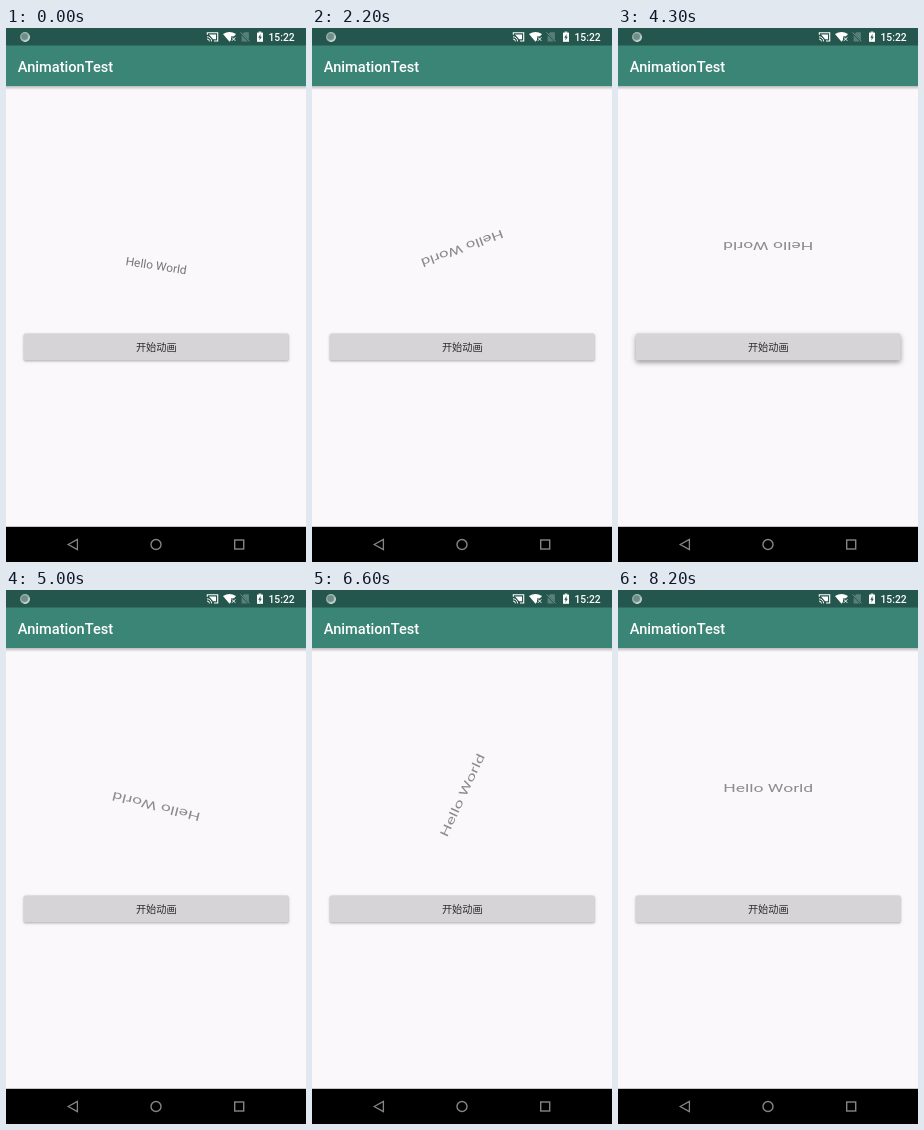
An HTML page with a canvas that plays this animation: 300x534 px, repeating every 8400 ms.

```html
<!DOCTYPE html>
<html lang="zh">
<head>
<meta charset="utf-8">
<title>AnimationTest</title>
<style>
html, body { margin: 0; width: 100%; height: 100%; overflow: hidden; background: #faf8fb; }
canvas { display: block; width: 300px; height: 534px; }
</style>
</head>
<body>
<canvas id="stage"></canvas>
<script>
const W = 300, H = 534, LOOP = 8400, STEP = 100;
const PRESS = 4300, RELEASE = 4800, TURN = 3900;
const SANS = 'Roboto, "Noto Sans CJK SC", "Noto Sans CJK", sans-serif';
const BAR = '#25564d', WHITE = '#fff', GREY = '#858585', DIM = '#6d8f88';
const FULL = 2 * Math.PI;

const canvas = document.getElementById('stage');
const ctx = canvas.getContext('2d');
const ratio = window.devicePixelRatio || 1;
canvas.width = W * ratio;
canvas.height = H * ratio;

const clamp = v => Math.max(0, Math.min(1, v));
const ease = u => (1 - Math.cos(Math.PI * clamp(u))) / 2;

// The first half turn is already under way when the loop starts
// and slows down slightly; the second runs at an even pace.
function halfTurns(t) {
  const s = t / 1000;
  const first = 0.142 + 0.329 * s - 0.0172 * s * s;
  return t < PRESS ? ease(t < 3100 ? first : 1) : 1 + ease((t - PRESS) / TURN);
}

function rect(x, y, w, h, color) {
  ctx.fillStyle = color;
  ctx.fillRect(x, y, w, h);
}

function path(points, closed) {
  ctx.beginPath();
  points.forEach(([x, y], i) => i ? ctx.lineTo(x, y) : ctx.moveTo(x, y));
  if (closed) ctx.closePath();
}

function shape(points, color) {
  path(points, true);
  ctx.fillStyle = color;
  ctx.fill();
}

function line(points, color, width, closed) {
  path(points, closed);
  ctx.strokeStyle = color;
  ctx.lineWidth = width;
  ctx.stroke();
}

function arc(x, y, r, from, to, color, width) {
  ctx.beginPath();
  ctx.arc(x, y, r, from, to);
  ctx.strokeStyle = color;
  ctx.lineWidth = width;
  ctx.stroke();
}

function disc(x, y, r, color) {
  ctx.beginPath();
  ctx.arc(x, y, r, 0, FULL);
  ctx.fillStyle = color;
  ctx.fill();
}

function label(text, x, y, size, weight, color, align = 'left') {
  ctx.font = `${weight} ${size}px ${SANS}`;
  ctx.textAlign = align;
  ctx.fillStyle = color;
  ctx.fillText(text, x, y);
}

function drawSync() {
  disc(19, 9, 4.9, '#a4b8b4');
  disc(18.6, 8.6, 3.3, DIM);
  arc(19, 9, 4.2, -0.3, 1.9, '#d3dfdc', 1.1);
}

function drawCast() {
  line([[201.3, 6.8], [201.3, 4.8], [211.7, 4.8], [211.7, 13], [208, 13]], WHITE, 1.1);
  shape([[203, 6.6], [210, 6.6], [210, 11.3], [207.2, 11.3]], WHITE);
  for (const r of [2.4, 4.6]) arc(201, 13.4, r, -Math.PI / 2, 0, WHITE, 1);
}

function drawWifi() {
  ctx.beginPath();
  ctx.moveTo(223.5, 13.8);
  ctx.lineTo(217, 6);
  ctx.quadraticCurveTo(223.5, 1.8, 230, 6);
  ctx.closePath();
  ctx.fillStyle = WHITE;
  ctx.fill();
  rect(225, 8.4, 5, 5.4, BAR);
  line([[225.9, 9.4], [229.3, 12.8]], WHITE, 1);
  line([[229.3, 9.4], [225.9, 12.8]], WHITE, 1);
}

function drawSim() {
  shape([[235.6, 6.9], [238.2, 4.3], [242.9, 4.3], [242.9, 13.5], [235.6, 13.5]], '#58807a');
  line([[234.6, 4.8], [243.6, 13.8]], BAR, 1.8);
  line([[234.6, 4.4], [243.6, 13.4]], '#7d9b95', 0.9);
}

function drawBattery() {
  rect(251, 4.6, 6, 9.2, WHITE);
  rect(252.7, 3.6, 2.6, 1.2, WHITE);
  shape([[254.6, 6], [252.3, 9.7], [253.7, 9.7], [253.4, 12.5], [255.8, 8.7], [254.4, 8.7]], BAR);
}

function drawTopBar() {
  const shade = ctx.createLinearGradient(0, 58, 0, 62);
  shade.addColorStop(0, 'rgba(0,0,0,.25)');
  shade.addColorStop(1, 'rgba(0,0,0,0)');
  rect(0, 58, W, 4, shade);
  rect(0, 0, W, 58, '#3b8577');
  rect(0, 0, W, 17.5, BAR);
  drawSync();
  drawCast();
  drawWifi();
  drawSim();
  drawBattery();
  label('15:22', 288.6, 12.8, 10.3, 500, WHITE, 'right');
  label('AnimationTest', 11.8, 43.8, 14.6, 500, WHITE);
}

function drawNavBar() {
  rect(0, 498.8, W, H - 498.8, '#000');
  line([[62.2, 516.5], [71.4, 511.4], [71.4, 521.6]], GREY, 1.3, true);
  arc(150, 516.5, 5, 0, FULL, GREY, 1.4);
  ctx.strokeRect(228.7, 512, 9, 9);
}

function drawButton(pressed) {
  ctx.save();
  ctx.shadowColor = `rgba(0,0,0,${pressed ? 0.4 : 0.32})`;
  ctx.shadowBlur = (pressed ? 5 : 2.4) * ratio;
  ctx.shadowOffsetY = (pressed ? 2.2 : 1) * ratio;
  ctx.beginPath();
  ctx.roundRect(17.8, 305.6, 264.8, 26.6, 1.5);
  ctx.fillStyle = '#d6d4d7';
  ctx.fill();
  ctx.restore();
  label('开始动画', 150.3, 322.8, 10.2, 400, '#2c2c2c', 'center');
}

function drawHello(turns) {
  const grow = clamp(turns);
  ctx.save();
  ctx.translate(150.2, 238.5 - 20.4 * turns);
  ctx.rotate(Math.PI * turns);
  ctx.scale(1 + grow / 2, 1);
  label('Hello World', 0, 4.2, 11.7, 400, `rgba(0,0,0,${0.54 - 0.1 * grow})`, 'center');
  ctx.restore();
}

function draw(now) {
  const t = Math.floor(now % LOOP / STEP) * STEP;
  ctx.setTransform(ratio, 0, 0, ratio, 0, 0);
  rect(0, 0, W, H, '#faf8fb');
  drawTopBar();
  drawNavBar();
  drawButton(t >= PRESS && t < RELEASE);
  drawHello(halfTurns(t));
}

const start = performance.now();
function frame() {
  draw(performance.now() - start);
  requestAnimationFrame(frame);
}
frame();
</script>
</body>
</html>
```
